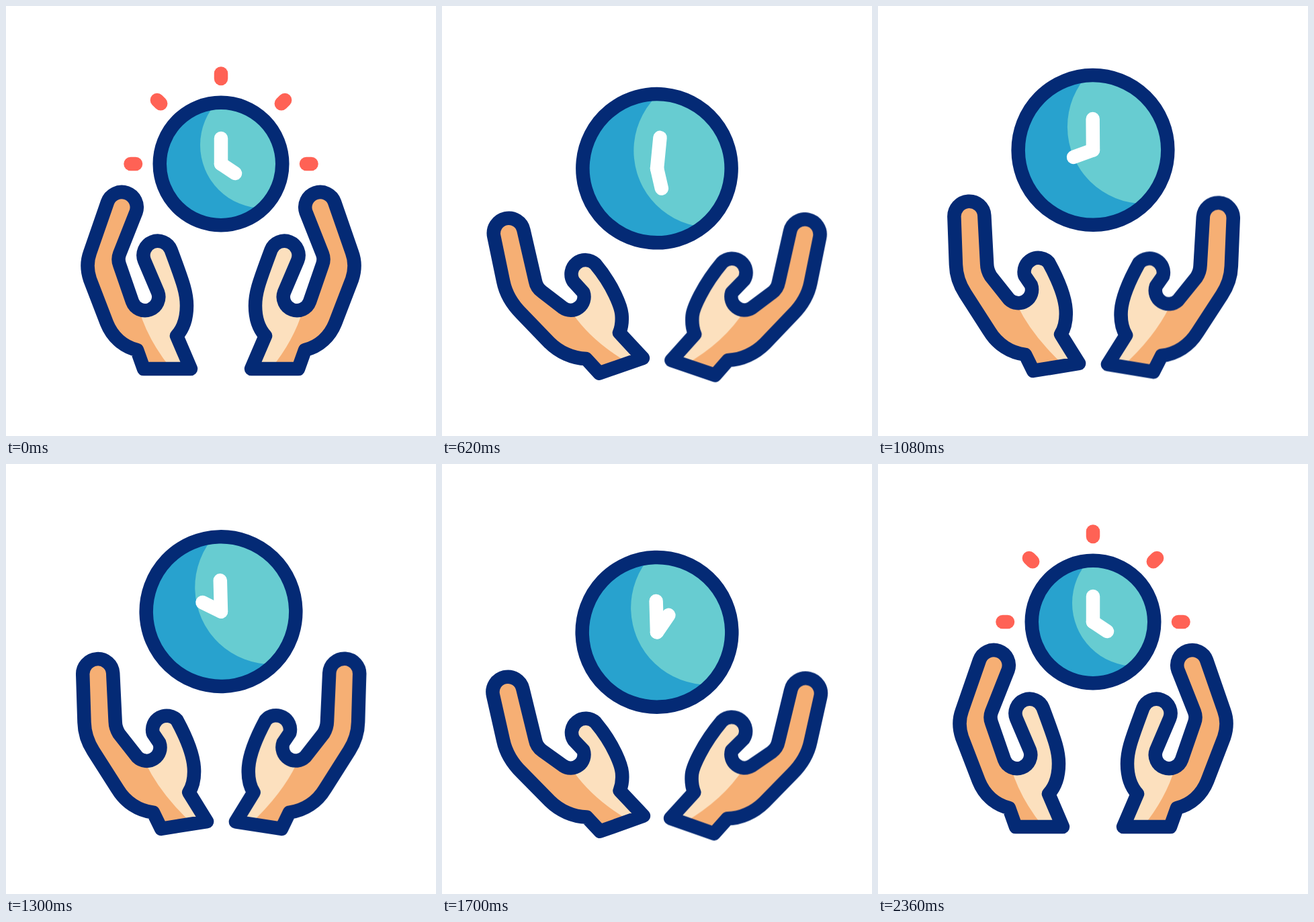
An HTML page without scripts for the animation above (2.4 s loop, 640x640 px).

```html
<!DOCTYPE html>
<html lang="en">
<head>
<meta charset="utf-8">
<title>Time care</title>
<style>
  :root {
    --navy: #042a75;
    --in: cubic-bezier(.47, 0, .745, .715);
    --out: cubic-bezier(.39, .575, .565, 1);

    --arm-rest: path("M205 540L275 540L254 491C264 480 269 464 269 446S265 415 245.5 363A21 21 0 0 0 206 379L226 426A20 20 0 0 1 188 440L169 385Q166 377 169 369L193.500 307A22.300 22.300 0 0 0 151 292L125 367Q118 386 125 407L150 472C158 492 174 507 195 512Z");
    --arm-half: path("M223 543L291 532L264 489C270 478 272 464 271 450S260 408 239.5 376A21 21 0 0 0 204 396L221 421A20 20 0 0 1 188 443L159 399Q153 392 153.5 383L155 315A22.300 22.300 0 0 0 110 314L107.5 385Q107 406 119 425L157 484C168 502 188 514 210 518Z");
    --arm-open: path("M235.5 547L300 523L264 486C267 478 268 470 267 460S255 418 226.5 385A21 21 0 0 0 194.500 412L209 427A20 20 0 0 1 179 450L148 429Q139 423 137 413L117 336A22.300 22.300 0 0 0 73 347L89 413Q95 440 118 462L160 503C175 517 195 526 215 526Z");
    --arm-lift: path("M230.5 542.5L299 533L273 489C280 478 282 466 281 451S275 416 257 381A21 21 0 0 0 221 400L230 414A20 20 0 0 1 197 435L170 399Q165 390 165 381L163 309A22.300 22.300 0 0 0 118 311L119 382Q119 404 131 424L166.500 482C178 502 197 515 219.500 518Z");
    --arm-close: path("M220 544L286 528L254 488C260 478 262 467 261 455S254 414 221 372A21 21 0 0 0 186 395L211 426A20 20 0 0 1 177 446L146 405Q141 399 141 390L143 319A22.300 22.300 0 0 0 97 320L96 392Q96 412 108 430L150 491C162 506 182 517 206 520Z");

    --palm-rest: path("M198 452Q212 500 250 545L330 545L300 330L205 345L207 433Z");
    --palm-half: path("M192 450Q215 500 262 534L330 545L300 330L195 370L203 431Z");
    --palm-open: path("M189 450Q220 498 282 532L330 545L300 330L179 388L191 436Z");
    --palm-lift: path("M210 446Q231 491 277 536L330 545L300 330L210 375L212 423Z");
    --palm-close: path("M188 452Q212 498 262 534L330 545L300 330L174 368L193 436Z");
  }
  /* The right thumb spreads a little wider. */
  .right {
    --arm-open: path("M235.5 548L300 524L264 486C267 478 268 470 267 460S251 415 220.5 380A21 21 0 0 0 188.500 407L207 425A20 20 0 0 1 178 448L148 429Q139 423 137 413L117 336A22.300 22.300 0 0 0 73 347L89 413Q95 440 118 462L160 503C175 517 195 526 215 526Z");
  }
  html, body { margin: 0; width: 100%; height: 100%; overflow: hidden; background: #fff; }
  svg { display: block; width: 640px; height: 640px; }
  path, circle, .ball, .shift { animation: 2400ms linear infinite; }

  .line { fill: none; stroke: var(--navy); stroke-width: 20.5; stroke-linejoin: round; }
  .skin { fill: #f6af74; }
  .palm { fill: #fce0be; animation-name: palm; }
  .arm { animation-name: arm; }
  .right path { animation-delay: 10ms; animation-fill-mode: backwards; }
  .shift { animation-name: shift; }

  .ball { animation-name: bob, tilt, grow; }
  .ball * { vector-effect: non-scaling-stroke; }
  .pointer { fill: none; stroke: #fff; stroke-width: 20.5; stroke-linecap: round; stroke-linejoin: round; }
  .hour { animation-name: turn; }
  .rays { stroke: #ff6255; stroke-width: 20.5; stroke-linecap: round; }
  .rays path { animation-name: ray; }

  @keyframes arm {
    0%, 4.17% { d: var(--arm-rest); animation-timing-function: var(--in); }
    16.67% { d: var(--arm-half); animation-timing-function: var(--out); }
    32.08% { d: var(--arm-open); animation-timing-function: ease-in-out; }
    48.75% { d: var(--arm-lift); animation-timing-function: ease-in-out; }
    75.83% { d: var(--arm-open); animation-timing-function: var(--in); }
    84.17% { d: var(--arm-close); animation-timing-function: var(--out); }
    98.33%, 100% { d: var(--arm-rest); }
  }
  @keyframes palm {
    0%, 4.17% { d: var(--palm-rest); animation-timing-function: var(--in); }
    16.67% { d: var(--palm-half); animation-timing-function: var(--out); }
    32.08% { d: var(--palm-open); animation-timing-function: ease-in-out; }
    48.75% { d: var(--palm-lift); animation-timing-function: ease-in-out; }
    75.83% { d: var(--palm-open); animation-timing-function: var(--in); }
    84.17% { d: var(--palm-close); animation-timing-function: var(--out); }
    98.33%, 100% { d: var(--palm-rest); }
  }
  @keyframes shift {
    0%, 4.17%, 98.33%, 100% { transform: translate(0, 0); }
    16.67% { transform: translate(1px, 1px); }
    32.08%, 35% { transform: translate(-1px, 3px); }
    54.17% { transform: translate(-1px, 0); }
    70.83%, 84.17% { transform: translate(0, 2.5px); }
  }
  @keyframes bob {
    0%, 4.17% { translate: 0 0; animation-timing-function: ease-in-out; }
    14.17% { translate: 0 -14px; animation-timing-function: ease-in-out; }
    30.6% { translate: 0 11px; animation-timing-function: ease-in-out; }
    48.75% { translate: 0 -23.5px; animation-timing-function: cubic-bezier(.3, .15, .6, 1); }
    74.17% { translate: 0 16.5px; animation-timing-function: ease-in-out; }
    98.33%, 100% { translate: 0 0; }
  }
  @keyframes tilt {
    0%, 4.17% { rotate: 0deg; animation-timing-function: var(--in); }
    16.67% { rotate: 4.5deg; animation-timing-function: var(--out); }
    26% { rotate: 5.6deg; animation-timing-function: var(--in); }
    35% { rotate: 4.7deg; animation-timing-function: var(--out); }
    54.17% { rotate: -1.5deg; }
    70.83% { rotate: -1.7deg; animation-timing-function: ease-in-out; }
    84.17% { rotate: -8.5deg; animation-timing-function: ease-in-out; }
    98.33%, 100% { rotate: 0deg; }
  }
  @keyframes grow {
    0%, 4.17% { scale: 1; animation-timing-function: ease-in-out; }
    29.17%, 70.83% { scale: 1.22; animation-timing-function: ease-in-out; }
    95.83%, 100% { scale: 1; }
  }
  @keyframes turn {
    0%, 4.17% { rotate: 0deg; animation-timing-function: var(--in); }
    16.67% { rotate: 11deg; animation-timing-function: cubic-bezier(.4, .2, .8, .8); }
    35% { rotate: 75deg; }
    54.17% { rotate: 174deg; }
    70.83% { rotate: 272deg; animation-timing-function: cubic-bezier(.3, .35, .7, .8); }
    84.17% { rotate: 341deg; animation-timing-function: var(--out); }
    98.33%, 100% { rotate: 360deg; }
  }
  @keyframes ray {
    0%, 4.17% { d: path("M0 -127V-134.500"); visibility: visible; animation-timing-function: ease-in-out; }
    16.2% { d: path("M0 -127V-127.010"); visibility: visible; }
    16.21%, 83.3% { d: path("M0 -127V-127.010"); visibility: hidden; }
    83.31% { d: path("M0 -127V-127.010"); visibility: visible; animation-timing-function: ease-in-out; }
    95.83%, 100% { d: path("M0 -127V-134.500"); visibility: visible; }
  }
</style>
</head>
<body>
<svg viewBox="0 0 640 640">
  <defs>
    <clipPath id="face"><circle r="91.250"/></clipPath>
    <clipPath id="left-arm"><path class="arm"/></clipPath>
    <clipPath id="right-arm" class="right"><path class="arm"/></clipPath>
  </defs>

  <g transform="translate(320 235)">
    <g class="rays">
      <path transform="rotate(-90)"/>
      <path transform="rotate(-45)"/>
      <path/>
      <path transform="rotate(45)"/>
      <path transform="rotate(90)"/>
    </g>
    <g class="ball">
      <circle r="91.250" fill="#28a2ce"/>
      <g clip-path="url(#face)"><circle cx="63" cy="-28" r="94" fill="#67ccd1"/></g>
      <circle class="line" r="91.250"/>
      <path class="pointer" d="M0 0V-38"/>
      <path class="pointer hour" d="M0 0L21 14"/>
    </g>
  </g>

  <g class="left">
    <path class="skin arm"/>
    <g clip-path="url(#left-arm)"><path class="palm"/></g>
    <path class="line arm"/>
  </g>
  <g class="right" transform="matrix(-1 0 0 1 640 0)">
    <g class="shift">
      <path class="skin arm"/>
      <g clip-path="url(#right-arm)"><path class="palm"/></g>
      <path class="line arm"/>
    </g>
  </g>
</svg>
</body>
</html>
```
